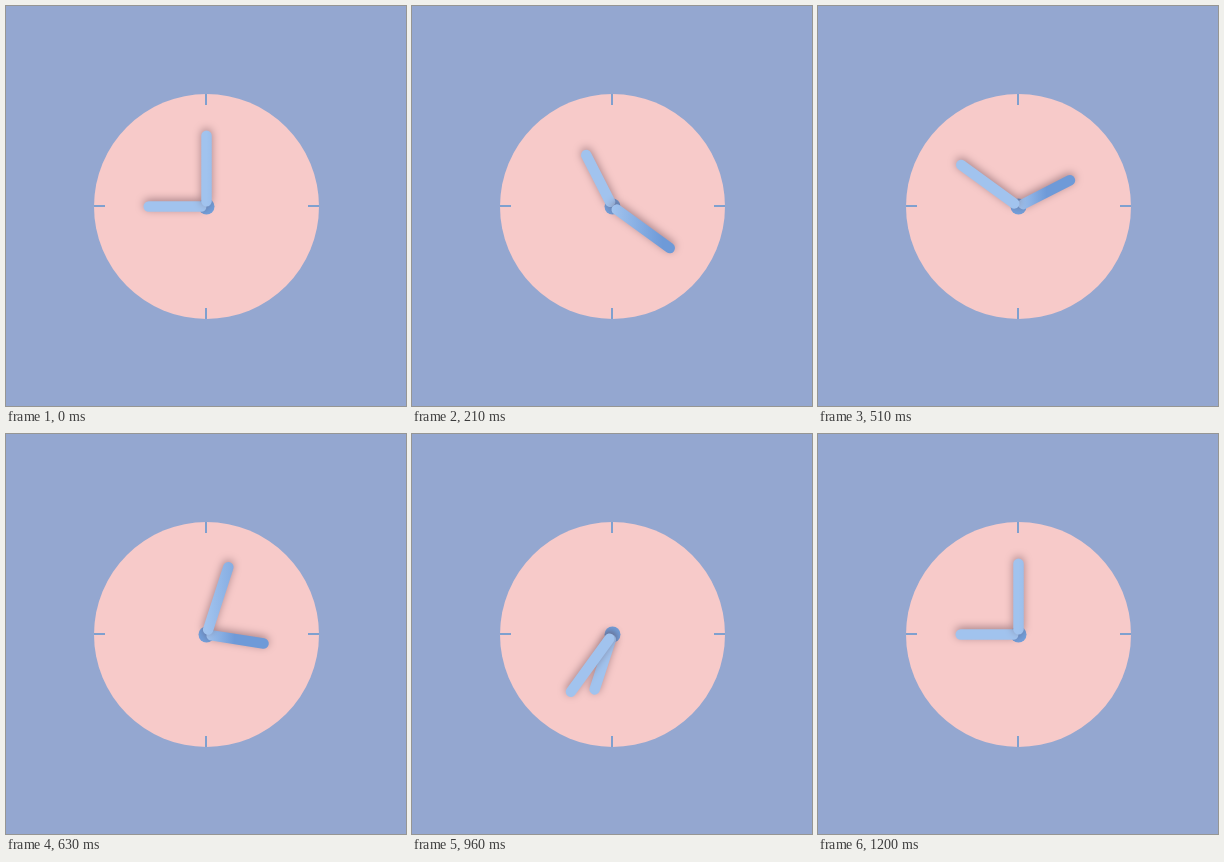
An HTML page with a canvas for the animation above (1.27 s loop, 400 by 400 pixels).

```html
<!DOCTYPE html>
<html lang="en">
<head>
<meta charset="utf-8">
<title>Clock</title>
<style>
  html, body { margin: 0; width: 100%; height: 100%; overflow: hidden; background: #94a7d0; }
  canvas { display: block; width: 400px; height: 400px; }
</style>
</head>
<body>
<canvas id="stage" width="400" height="400"></canvas>
<script>
const ctx = document.getElementById('stage').getContext('2d');
const CENTER = 200.5;
const FACE_RADIUS = 112.5;
const HAND_WIDTH = 10.5;
const LOOP = 1270, STEP = 30, STEPS = 40;
const LIGHT = '#a1c3ee', DARK = '#6e9ad8';

function disc(radius, color) {
  ctx.fillStyle = color;
  ctx.beginPath();
  ctx.arc(CENTER, CENTER, radius, 0, Math.PI * 2);
  ctx.fill();
}

function drawFace() {
  ctx.fillStyle = '#94a7d0';
  ctx.fillRect(0, 0, 400, 400);
  disc(FACE_RADIUS, '#f7cac9');
  ctx.fillStyle = '#7fa0cf';
  for (const start of [88, 302]) {
    ctx.fillRect(199, start, 2, 11);
    ctx.fillRect(start, 199, 11, 2);
  }
  disc(8, '#729fdb');
}

// Shading and shadow keep their screen direction while the hand turns.
function drawHand(degrees, length, shadeWidth) {
  const angle = degrees * Math.PI / 180;
  const dx = Math.sin(angle), dy = -Math.cos(angle);
  const cap = HAND_WIDTH / 2, tip = length - cap;
  const shade = ctx.createLinearGradient(CENTER, 0, CENTER + shadeWidth, 0);
  shade.addColorStop(0, LIGHT);
  shade.addColorStop(1, DARK);

  ctx.save();
  ctx.shadowColor = 'rgba(90, 60, 70, 0.5)';
  ctx.shadowBlur = 9;
  ctx.shadowOffsetY = -2;
  ctx.strokeStyle = shade;
  ctx.lineWidth = HAND_WIDTH;
  ctx.lineCap = 'round';
  ctx.beginPath();
  ctx.moveTo(CENTER + dx * cap, CENTER + dy * cap);
  ctx.lineTo(CENTER + dx * tip, CENTER + dy * tip);
  ctx.stroke();
  ctx.restore();
}

function draw(time) {
  const step = Math.min(STEPS, Math.floor(time % LOOP / STEP));
  drawFace();
  drawHand(270 + step * 9, 63, 28);
  drawHand(step * 18, 76, 50);
}

let start;
function tick(now) {
  start ??= now;
  draw(now - start);
  requestAnimationFrame(tick);
}
draw(0);
requestAnimationFrame(tick);
</script>
</body>
</html>
```
